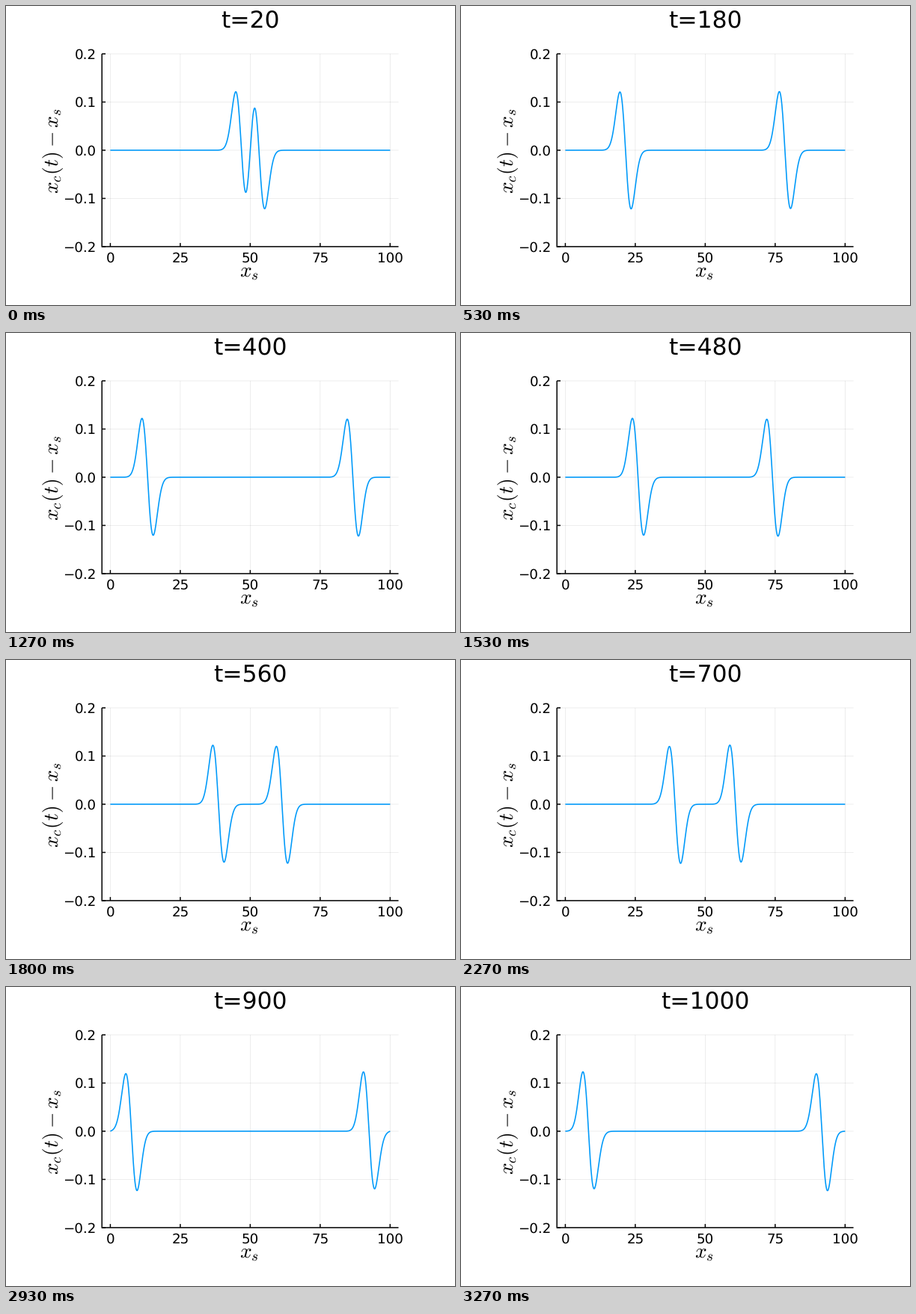
A matplotlib script that plays this animation: 600x400 px, repeating every 3.34 s.

```python
import numpy as np
import matplotlib.pyplot as plt
from matplotlib.animation import FuncAnimation
from matplotlib.patches import Rectangle

plt.rcParams.update({
    "font.family": "DejaVu Sans",
    "mathtext.fontset": "cm",
    "text.hinting": "none",
    "lines.solid_capstyle": "butt",
})

WIDTH, HEIGHT, DPI = 600, 400, 100
LOOP_MS, TICK_MS = 3340, 20
STEPS, STEPS_PER_SECOND, TIME_STEP = 50, 15, 20
LEFT, RIGHT, TOP, BOTTOM = 128.2, 524.5, 64.0, 321.9
TICK_LENGTH = 4.8
PT = 72 / DPI  # points per pixel

LENGTH = 100
SPEED = 0.15834
SPACING = 0.1  # distance between neighbouring masses of the chain
AMPLITUDE, SIGMA = 0.1, 2.0

fig = plt.figure(figsize=(WIDTH / DPI, HEIGHT / DPI), dpi=DPI, facecolor="white")
ax = fig.add_axes([0, 0, 1, 1])
ax.set_xlim(0, WIDTH)
ax.set_ylim(HEIGHT, 0)
ax.axis("off")


def to_x(value):
    return LEFT + (value + 3) / 106 * (RIGHT - LEFT)


def to_y(value):
    return BOTTOM - (value + 0.2) / 0.4 * (BOTTOM - TOP)


def segment(xs, ys, width=1.5, **style):
    ax.plot(xs, ys, color="black", lw=width * PT, snap=False, **style)


def label(x, y, text, size, **style):
    style = {"ha": "center", "va": "baseline", **style}
    return ax.text(x, y, text, fontsize=size * PT, color="black", **style)


def pulse(z, skew):
    """Gaussian derivative plus the first-order effect of lattice dispersion."""
    q = z / SIGMA
    bell = AMPLITUDE * np.exp(-q**2 / 2)
    return bell * (-z - skew * (q**4 - 6 * q**2 + 3) / SIGMA**2)


def displacement(x, t):
    travel = SPEED * t
    skew = travel * SPACING**2 / 24
    total = np.zeros_like(x)
    for image in range(-3, 4):
        z = x - LENGTH / 2 - image * LENGTH
        total += pulse(z - travel, skew) + pulse(z + travel, -skew)
    return total


for value in (0, 25, 50, 75, 100):
    x = to_x(value)
    segment([x, x], [TOP, BOTTOM], 0.7, alpha=0.1)
    segment([x, x], [BOTTOM, BOTTOM - TICK_LENGTH])
    label(x, 343.2, str(value), 18.3)

for value in (-0.2, -0.1, 0.0, 0.1, 0.2):
    y = to_y(value)
    segment([LEFT, RIGHT], [y, y], 0.7, alpha=0.1)
    segment([LEFT, LEFT + TICK_LENGTH], [y, y])
    label(120.5, y + 6.6, f"{value:.1f}".replace("-", "\u2212"), 18.3, ha="right")

segment([LEFT, LEFT, RIGHT], [TOP, BOTTOM, BOTTOM], solid_joinstyle="miter")

label(325, 362, "$x_s$", 27.5)
label(70, 193.7, "$x_c(t) - x_s$", 27.7, rotation=90, rotation_mode="anchor")
title = label(326.5, 28.2, "", 31.4)

positions = np.linspace(0, LENGTH, 1001)
curve, = ax.plot([], [], color="#009AFA", lw=1.6 * PT, zorder=3, snap=False)
curve.set_clip_path(Rectangle((LEFT, TOP), RIGHT - LEFT, BOTTOM - TOP,
                              transform=ax.transData))


def update(frame):
    seconds = (frame + 0.5) * TICK_MS / 1000
    # step times are rounded to the nearest hundredth of a second
    step = min(int((seconds + 0.005) * STEPS_PER_SECOND), STEPS - 1)
    t = TIME_STEP * (step + 1)
    title.set_text(f"t={t}")
    curve.set_data(to_x(positions), to_y(displacement(positions, t)))
    return title, curve


animation = FuncAnimation(fig, update, frames=LOOP_MS // TICK_MS, interval=TICK_MS,
                          repeat=True, repeat_delay=0, blit=False)
plt.show()
```
